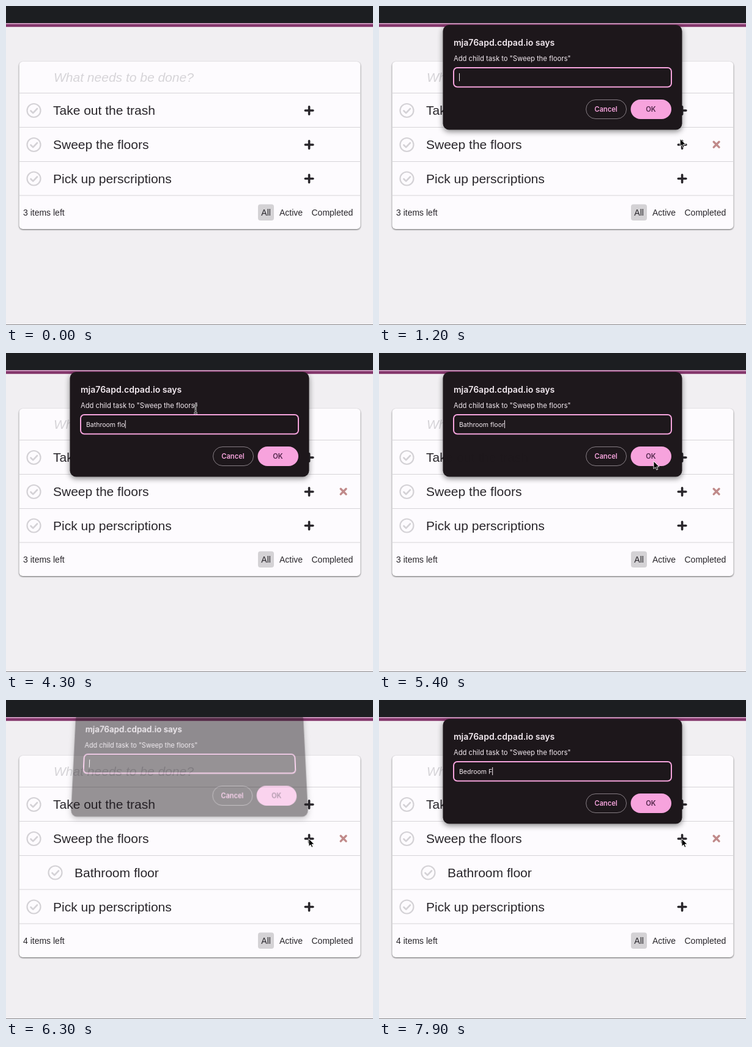
Recreate the animation shown at these times as an HTML page. Size 600 by 522 pixels, loop 8 s.

```html
<!DOCTYPE html>
<html lang="en">
<head>
<meta charset="utf-8">
<title>Nested to-do list</title>
<style>
html, body { margin: 0; width: 100%; height: 100%; overflow: hidden; background: #f1eff2; }
svg { position: absolute; left: 0; top: 0; width: 600px; height: 522px; overflow: visible; }
#page { font: 21px "Liberation Sans", Arial, sans-serif; fill: #29262b; overflow: hidden; }
#page .small { font-size: 14px; }
#clip { position: absolute; left: 0; top: 28px; width: 600px; height: 494px; overflow: hidden; }
#dialog { top: -28px; transform-origin: 300px 202px; font: 11.2px Inter, sans-serif; fill: #f3eaf0; }
#dialog .bold { font-weight: 600; }
#box { filter: drop-shadow(0 3px 5px #0007); }
#card { filter: drop-shadow(0 1px 1.2px #0009); }
</style>
</head>
<body>
<svg id="page" viewBox="0 0 600 522"></svg>
<div id="clip">
  <svg id="dialog" viewBox="0 0 600 522">
    <rect id="box" x="104.5" y="31" width="391" height="171.5" rx="10" fill="#1d171b"/>
    <text class="bold" x="122" y="64.5" font-size="14">mja76apd.cdpad.io says</text>
    <text x="122" y="90">Add child task to "Sweep the floors"</text>
    <rect x="122" y="101" width="356" height="31.5" rx="6" fill="none" stroke="#f5a3dc" stroke-width="2"/>
    <text id="typed" x="131" y="120.5" font-size="10.5" xml:space="preserve"></text>
    <rect id="caret" y="110" width="1" height="13"/>
    <rect x="338.5" y="153.5" width="66" height="31" rx="15.5" fill="none" stroke="#857d83"/>
    <text class="bold" x="371" y="173" text-anchor="middle" fill="#f5a3dc">Cancel</text>
    <rect x="411.5" y="153" width="66.5" height="32" rx="16" fill="#f7a3dd"/>
    <text class="bold" x="444.5" y="173" text-anchor="middle" fill="#52264a">OK</text>
  </svg>
</div>
<svg id="pointer" viewBox="0 0 600 522">
  <path id="arrow" d="M0 0V12.5L2.9 9.9L4.8 14.2L6.9 13.3L5 9.1H9Z" fill="#000" stroke="#fff" stroke-width=".9"/>
  <g id="beam" fill="none">
    <path id="stem" d="M-3-6.5Q0-6.5 0-4.5Q0-6.5 3-6.5M0-4.5V4.5M-3 6.5Q0 6.5 0 4.5Q0 6.5 3 6.5M-1.5 2H1.5" stroke="#fff" stroke-width="2.6"/>
    <path d="M-3-6.5Q0-6.5 0-4.5Q0-6.5 3-6.5M0-4.5V4.5M-3 6.5Q0 6.5 0 4.5Q0 6.5 3 6.5M-1.5 2H1.5" stroke="#222" stroke-width="1.1"/>
  </g>
</svg>
<script>
const $ = id => document.getElementById(id);
const clamp = v => Math.max(0, Math.min(1, v));
const show = (id, on) => $(id).setAttribute('visibility', on ? 'visible' : 'hidden');

const rule = y => `<path d="M21.5 ${y}H579.5" stroke="#d6d4d8"/>`;
const plus = y => `<path d="M489.3 ${y}h12.6M495.6 ${y - 6.3}v12.6" stroke="#29262b" stroke-width="3.6" stroke-linecap="round"/>`;
const cross = (id, y) => `<path id="${id}" d="M547.2 ${y - 4.4}l8.8 8.8m0-8.8l-8.8 8.8" stroke="#c08a8a" stroke-width="3.4" stroke-linecap="round"/>`;

// One list row centred on y, shifted right when nested.
const row = (text, y, indent = 0) => `
  <g fill="none" stroke="#d4d2d6" stroke-width="2.2" stroke-linecap="round" stroke-linejoin="round">
    <circle cx="${45.5 + indent}" cy="${y}" r="11"/>
    <path d="M${40.5 + indent} ${y + .5}l3.7 3.7l6.8-7.2" stroke-width="2.6"/>
  </g>
  <text x="${77 + indent}" y="${y + 7.3}">${text}</text>
  ${indent ? '' : plus(y)}${rule(y + 27.5)}`;

$('page').innerHTML = `
  <rect width="600" height="522" fill="#f1eff2"/>
  <rect width="600" height="28" fill="#1c1e21"/>
  <rect y="28" width="600" height="1.5" fill="#e3a9d3"/>
  <rect y="29.5" width="600" height="5" fill="#84376c"/>
  <rect y="34.5" width="600" height="1" fill="#f8f4f8"/>
  <rect y="521" width="600" height="1" fill="#8b898c"/>
  <rect id="card" x="21.5" y="91" width="558" rx="6" fill="#fdfbfe"/>
  <text x="78" y="123.5" font-style="italic" fill="#d6d4d8">What needs to be done?</text>
  ${rule(142.5)}
  ${row('Take out the trash', 171)}
  ${row('Sweep the floors', 227)}
  ${cross('cross2', 226.7)}
  <g id="child">${row('Bathroom floor', 282.5, 35)}</g>
  <g id="rest">
    ${row('Pick up perscriptions', 282.5)}
    ${cross('cross3', 282.5)}
    <rect x="412" y="324.5" width="26" height="26.5" rx="4" fill="#d4d2d5"/>
    <g class="small">
      <text id="count" x="28" y="343"></text>
      <text x="417.3" y="343">All</text>
      <text x="447" y="343">Active</text>
      <text x="499.5" y="343">Completed</text>
    </g>
  </g>`;

// Pointer stops: time, x, y
const stops = [
  [100, 552, 270], [650, 499, 222], [1150, 499, 222], [1600, 310, 92],
  [5150, 310, 92], [5350, 449, 177], [5600, 449, 177], [5950, 495, 227]
];

function pointerAt(t) {
  const i = stops.findIndex(s => s[0] > t);
  if (i < 0) return stops.at(-1).slice(1);
  if (i === 0) return stops[0].slice(1);
  const [t0, x0, y0] = stops[i - 1], [t1, x1, y1] = stops[i];
  const u = (t - t0) / (t1 - t0), k = u * u * (3 - 2 * u);
  return [x0 + (x1 - x0) * k, y0 + (y1 - y0) * k];
}

const ADDED = 5450;
const typing = (text, start, step, t) =>
  text.slice(0, Math.max(0, 1 + Math.floor((t - start) / step)));

function drawDialog(t) {
  const second = t > 6000;
  const p = clamp((t - (second ? 6208 : 820)) / 200);
  const q = 1 - p;
  const closing = second ? 0 : clamp((t - 5400) / 120);
  const s = 1 - .0133 * q;
  // The top edge leans back and straightens while the panel drops in.
  $('dialog').style.transform = q
    ? `matrix3d(${s},0,0,0, 0,${s * (1 + .083 * q)},0,${-.0005 * q}, 0,0,1,0, 0,${-21.7 * q},0,1)`
    : 'none';
  $('dialog').style.opacity = p * (1 - closing);
  $('typed').textContent = second
    ? typing('Bedroom Floor', 6900, 120, t)
    : typing('Bathroom floor', 2900, 125, t);
  const width = $('typed').textContent ? $('typed').getComputedTextLength() : 0;
  $('caret').setAttribute('x', 131 + width);
}

function draw(t) {
  const added = t >= ADDED, [x, y] = pointerAt(t);
  const inLowerRow = t < 800 && y > 254.5;
  $('card').setAttribute('height', added ? 330 : 274);
  $('rest').setAttribute('transform', `translate(0 ${added ? 56 : 0})`);
  $('count').textContent = `${added ? 4 : 3} items left`;
  show('child', added);
  show('cross2', t >= 100 && !inLowerRow);
  show('cross3', t >= 100 && inLowerRow);
  drawDialog(t);

  const overText = y < 134;
  show('arrow', t >= 100 && !overText);
  show('beam', overText);
  for (const id of ['arrow', 'beam']) $(id).setAttribute('transform', `translate(${x} ${y})`);
}

const begin = performance.now();
function tick() {
  draw((performance.now() - begin) % 8000);
  requestAnimationFrame(tick);
}
tick();
</script>
</body>
</html>
```
